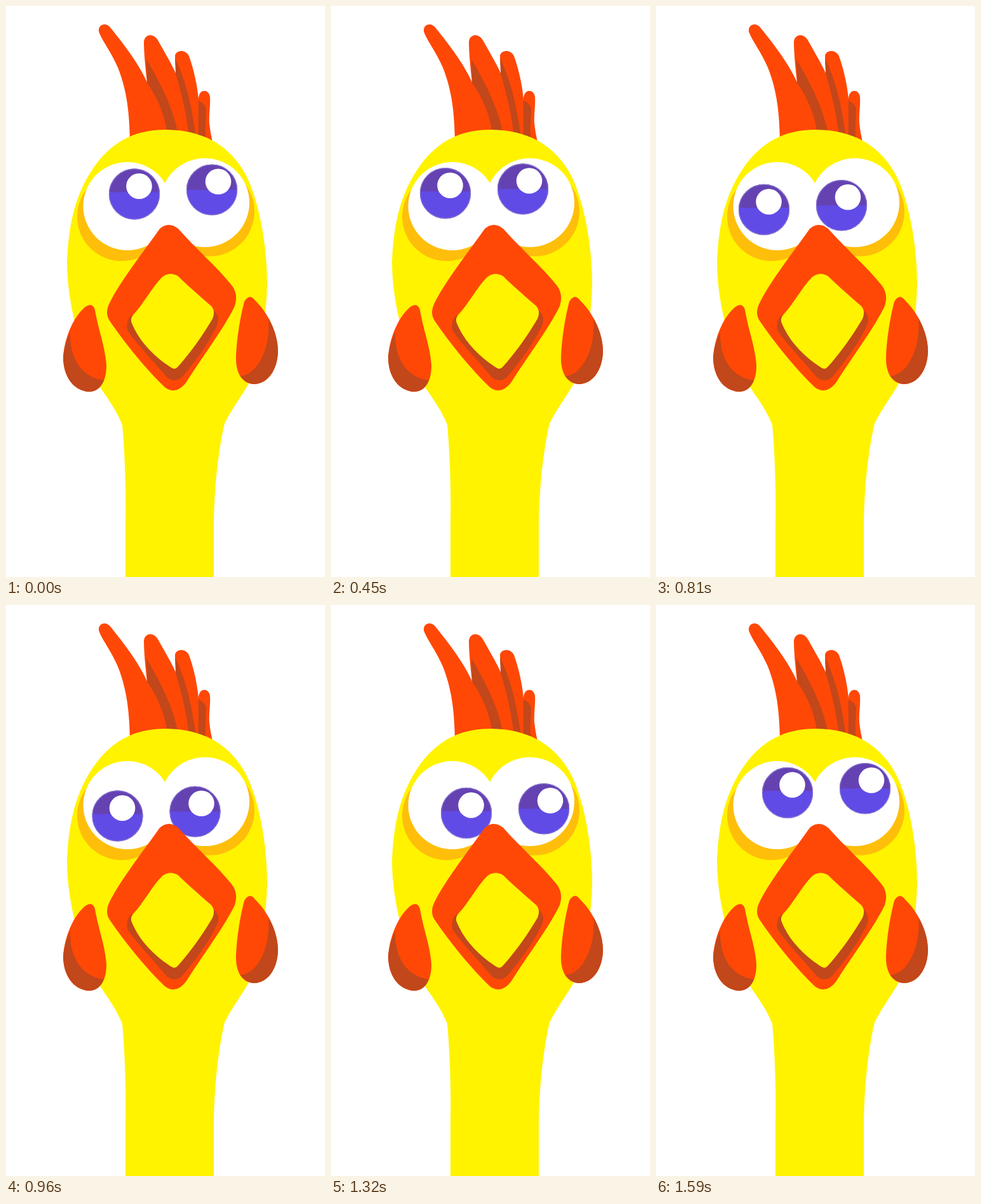
Recreate the animation shown at these times as an HTML page. Size 502 px wide and 900 px high, loop 1620 ms.

```html
<!DOCTYPE html>
<html lang="en">
<head>
<meta charset="utf-8">
<title>Chicken rolling its eyes</title>
<style>
  html, body { margin: 0; width: 100%; height: 100%; overflow: hidden; background: #fff; }
  svg { display: block; width: 100%; height: 100%; }
  .skin { fill: #fff300; }
  .red { fill: #ff4806; }
  .dark { fill: #c2471a; }
  .shade { fill: #ffbe0a; }
  .white { fill: #fff; }
  .iris { fill: #614be6; }
  .lid { fill: #6542b2; }
  .rim { fill: none; stroke: #8a78cf; stroke-width: 1.2; }
</style>
</head>
<body>
<svg viewBox="0 0 502 900">
  <g id="comb">
    <path class="red" d="M195 210C194 170 191 135 176 97C166 73 150 53 146 40C145 28 158 25 165 35C182 56 208 89 222 120C219 95 217 72 217 56C219 43 233 43 239 54C249 72 260 90 268 108C267 96 266 85 266 78C268 69 283 68 288 79C296 101 301 126 303 147C303 130 319 130 321 143C322 157 319 172 320 185Q322 202 325 214Z"/>
    <path class="dark" d="M221 84C243 121 263 161 271 202H254C250 171 238 144 222 121Z"/>
    <path class="dark" d="M266 82C285 121 293 164 299 206H288C284 169 276 137 267 107Z"/>
    <path class="dark" d="M303 149Q311 152 315 161C315 178 312 192 315 211H302C304 185 302 164 303 149Z"/>
  </g>

  <path class="skin" d="M250 195C318 195 363 227 385 283C403 330 411 390 411 437C410 495 400 550 381 597C370 616 356 634 344 658C333 705 327 770 327 820V900H188V815C189 760 187 705 183 660C174 638 162 621 150 604C118 548 97 475 96 405C98 352 106 316 121 284C149 226 190 195 250 195Z"/>

  <g id="eyes">
    <circle class="shade" cx="182" cy="332" r="70"/>
    <circle class="shade" cx="320.5" cy="324" r="70.5"/>
    <circle class="white" cx="191" cy="315.5" r="69.5"/>
    <circle class="white" cx="313" cy="310" r="70"/>
    <g id="gaze">
      <circle class="iris" r="40"/>
      <path class="lid" d="M-39.9-3A40 40 0 0 1 39.9-3Z"/>
      <circle class="rim" r="39.6"/>
      <circle class="white" cx="7.5" cy="-12.5" r="20.3"/>
      <g transform="translate(122 -6.7)">
        <circle class="iris" r="40"/>
        <path class="lid" d="M-40 0A40 40 0 0 1 40 0Z"/>
        <circle class="rim" r="39.6"/>
        <circle class="white" cx="10" cy="-13" r="20.3"/>
      </g>
    </g>
  </g>

  <g id="beak">
    <path class="red" d="M242 351Q256 339 271 351C299 383 332 411 355 440Q366 454 360 473C342 510 308 554 283 594Q267 614 250 601C217 569 186 530 163 496Q155 484 163 468C181 432 214 391 242 351Z"/>
    <path class="dark" d="M197 488Q188 496 191 511C205 532 231 559 254 586Q265 594 276 586C297 562 318 533 332 504Q338 489 327 480Z"/>
    <path class="skin" d="M246 427Q258 418 271 426C284 439 306 458 323 473Q330 481 325 493C309 520 290 547 270 569Q266 574 260 570C235 554 210 530 198 500Q195 493 200 487C217 469 229 444 246 427Z"/>
  </g>

  <g id="wattles">
    <path class="red" d="M124 475Q136 466 140 479C145 510 157 540 158 567C158 593 147 608 130 608C106 606 90 584 90 553C92 523 106 490 124 475Z"/>
    <path class="dark" d="M101 514C100 553 117 585 154 590Q147 608 130 608C106 606 90 584 90 553Q92 532 101 514Z"/>
    <path class="red" d="M375 466Q383 452 392 464C413 485 428 515 428 545C427 575 411 596 390 596C371 595 361 578 362 552C363 523 369 489 375 466Z"/>
    <path class="dark" d="M413 492Q428 519 428 545C427 575 411 596 390 596Q377 595 369 583C395 582 417 540 413 492Z"/>
  </g>
</svg>
<script>
const LOOP = 1620, STEP = 30;
const gaze = document.getElementById('gaze');

// Left iris centre along its roll: [ms, x, y]
const path = [
  [0, 202, 296.5], [240, 190, 292.8], [450, 180, 295.2], [540, 175.5, 301.5],
  [810, 170, 321], [960, 175.5, 332.5], [1170, 197.5, 340.5],
  [1320, 213, 328], [1590, 207, 296]
];

const knot = i => {
  const n = path.length, turn = Math.floor(i / n);
  const [t, x, y] = path[i - turn * n];
  return [t + turn * LOOP, x, y];
};

// Tangent of a parabola through three neighbouring knots
function slope(i, axis) {
  const a = knot(i - 1), b = knot(i), c = knot(i + 1);
  const before = b[0] - a[0], after = c[0] - b[0];
  const left = (b[axis] - a[axis]) / before, right = (c[axis] - b[axis]) / after;
  return (left * after + right * before) / (before + after);
}

function position(time, axis) {
  const i = path.findLastIndex(p => p[0] <= time);
  const a = knot(i), b = knot(i + 1), span = b[0] - a[0];
  const u = (time - a[0]) / span, v = 1 - u;
  return v * v * ((1 + 2 * u) * a[axis] + u * span * slope(i, axis))
       + u * u * ((1 + 2 * v) * b[axis] - v * span * slope(i + 1, axis));
}

function draw() {
  const time = Math.floor(performance.now() % LOOP / STEP) * STEP;
  gaze.setAttribute('transform', `translate(${position(time, 1)} ${position(time, 2)})`);
  requestAnimationFrame(draw);
}
draw();
</script>
</body>
</html>
```
